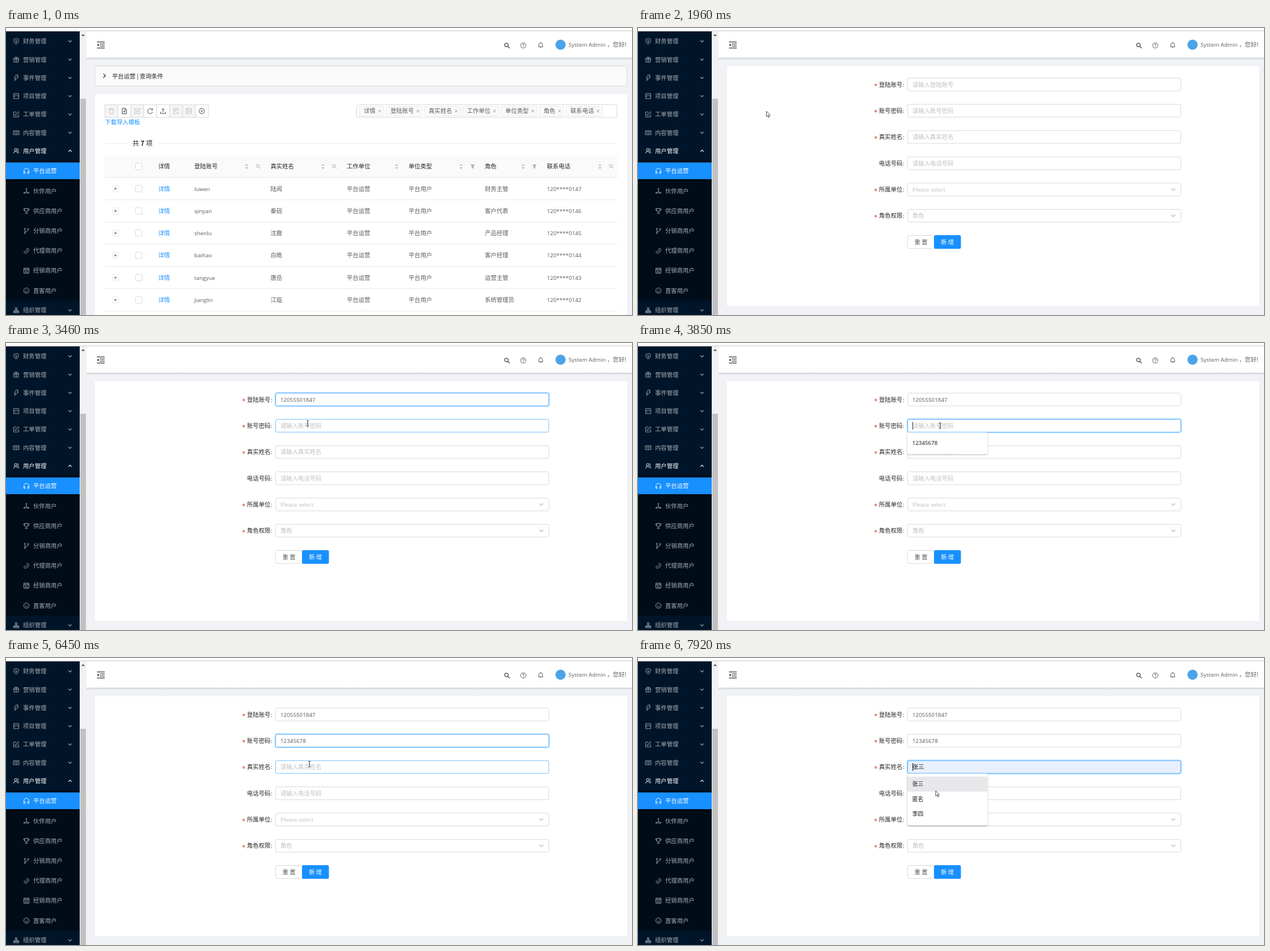
An HTML page that plays this animation: 1104x507 px, repeating every 7990 ms.

```html
<!DOCTYPE html>
<html lang="zh">
<head>
<meta charset="utf-8">
<title>User admin</title>
<style>
  html, body { margin: 0; width: 100%; height: 100%; overflow: hidden; background: #f0f2f5; }
  svg { display: block; width: 1104px; height: 507px; }
  text { white-space: pre; font-family: "Noto Sans CJK SC", "Noto Sans CJK", sans-serif; }
  text.latin { font-family: "Open Sans", "Noto Sans", sans-serif; }
</style>
</head>
<body>
<svg id="stage" viewBox="0 0 1104 507" xmlns="http://www.w3.org/2000/svg">
  <defs>
    <filter id="soft" x="-10%" y="-20%" width="120%" height="150%">
      <feDropShadow dx="0" dy="1" stdDeviation="1.3" flood-color="#000" flood-opacity=".4"/>
    </filter>
    <linearGradient id="fall" x2="0" y2="1">
      <stop offset="0" stop-color="#001529" stop-opacity=".16"/>
      <stop offset="1" stop-color="#001529" stop-opacity="0"/>
    </linearGradient>
  </defs>
  <g id="base"></g>
  <g id="view"></g>
  <g id="pointer"></g>
</svg>
<script>
const LOOP = 7990;
const BLUE = '#1890ff', SKY = '#40a9ff', DARK = '#262626', BODY = '#5c5c5c', PALE = '#bfbfbf', EDGE = '#d9d9d9';
const $ = id => document.getElementById(id);

// drawing helpers
const rect = (x, y, w, h, fill, stroke = 'none', r = 0, extra = '') =>
  `<rect x="${x}" y="${y}" width="${w}" height="${h}" rx="${r}" fill="${fill}" stroke="${stroke}" ${extra}/>`;
const path = (d, stroke, width = 1, fill = 'none') =>
  `<path d="${d}" fill="${fill}" stroke="${stroke}" stroke-width="${width}" stroke-linejoin="round"/>`;
const at = (x, y, inner, scale = 1) => `<g transform="translate(${x} ${y}) scale(${scale})">${inner}</g>`;
const hline = (x, y, w, color = '#e8e8e8') => rect(x, y, w, 1, color);

// y is the middle of the line of text
function text(x, y, s, fill = BODY, size = 10.35, extra = '') {
  const latin = /^[\x20-\x7e]+$/.test(s);
  const px = latin ? size * 0.947 : size;
  return `<text x="${x}" y="${y + size * 0.365}" font-size="${px}" fill="${fill}" ${latin ? 'class="latin"' : ''} ${extra}>${s}</text>`;
}

const ring = (x, y, r) => `M${x - r} ${y}a${r} ${r} 0 1 0 ${2 * r} 0a${r} ${r} 0 1 0 ${-2 * r} 0`;

const ICONS = {
  shield: 'M-4-3.6L0-5 4-3.6V1Q3 3.5 0 5Q-3 3.5-4 1ZM-1.8-2L0 0 1.8-2M0 0V2.6M-1.5 1H1.5',
  gift: 'M-4.5-2.5H4.5V0H-4.5ZM-4 0V4.5H4V0M0-2.5V4.5M0-2.5C-4-5-1-6 0-2.5C1-6 4-5 0-2.5',
  bolt: 'M-.5-5H3.5L1.5-1.5H4L-3 5L-1 .5H-3.5Z',
  board: 'M-4.5-4.5H4.5V4.5H-4.5ZM-2.4-2.5V2M0-2.5V0M2.4-2.5V1',
  edit: 'M4.3 0V4.5H-4.5V-4.3H0M-2 2L-1.6 0L3.5-5L5-3.5L0 1.5Z',
  book: 'M0-2.5V4M-5-3.5H-1Q0-3.5 0-2.5Q0-3.5 1-3.5H5V3.5H1Q0 3.5 0 4Q0 3.5-1 3.5H-5ZM-3.5-1.3H-1.6M-3.5.7H-1.6M1.6-1.3H3.5M1.6.7H3.5',
  users: ring(-1, -2, 2.2) + 'M-4.6 4.5Q-4 .6-1 .4Q1.6.6 3 4.5M1.6-4.4A2.3 2.3 0 0 1 2.6-.2Q4.4 1.2 4.8 3.6',
  headset: 'M-4.5 4.2V-.3A4.5 4.5 0 0 1 4.5-.3V4.2H2.3V1H4.5M-4.5 1H-2.3V4.2H-4.5',
  node: ring(0, -3.6, .9) + ring(-3.9, 3.3, .9) + ring(3.9, 3.3, .9) + 'M0-2.6V.6L-3.2 2.8M0 .6L3.2 2.8M-2.6 3.6H2.6',
  trophy: 'M-2.8-4.5H2.8V-1A2.8 2.8 0 0 1-2.8-1ZM-2.8-3.5H-4.8V-2Q-4.5-.5-2.6-.5M2.8-3.5H4.8V-2Q4.5-.5 2.6-.5M0 2V4.5M-2.5 4.5H2.5',
  branch: ring(-2.6, -3.6, 1.1) + ring(-2.6, 3.8, 1.1) + ring(3, -3, 1.1) + 'M-2.6-2.4V2.6M3-1.8Q3 .6-2.6 2',
  phone: 'M2-4.5L4.5-2.2Q4 4-2.5 4.5L-4.6 2.2L-2.2.2L-.6 1.5Q1.2.8 1.6-1L.2-2.4Z',
  shop: 'M-4.5-4.5H4.5V4.5H-4.5ZM-4.5-1.5H4.5M-2-4.5V-1.5M2-4.5V-1.5M-1.7 4.5V1.2H1.7V4.5',
  smile: ring(0, 0, 4.7) + 'M-2.3 1Q0 4 2.3 1M-1.8-1.8V-.8M1.8-1.8V-.8',
  org: 'M-1.5-4.5H1.5V-1.8H-1.5ZM0-1.8V1.8M-3.6 1.8V.2H3.6V1.8M-4.8 1.8H-2.4V4.4H-4.8ZM-1.2 1.8H1.2V4.4H-1.2ZM2.4 1.8H4.8V4.4H2.4Z',
  trash: 'M-4.5-3H4.5M-1.6-3V-4.6H1.6V-3M-3.5-3L-3 4.5H3L3.5-3',
  fileAdd: 'M-3.8-4.8H1L3.8-2V4.8H-3.8ZM1-4.8V-2H3.8M0-.9V3M-2 1H2',
  reload: 'M3.6-2.4A4.4 4.4 0 1 0 4.3 1.2M4.2-4.6V-2H1.6',
  upload: 'M-4.5 1.6V4.3H4.5V1.6M0 2V-4.2M-2-2.2L0-4.4 2-2.2',
  report: 'M4-.2V-4.5H-4V4.5H0M-2.2-2.3H2.2M-2.2-.2H.4M1.5 4.5Q3 .5 4.6 4.5ZM3 1.2V2',
  wallet: 'M-4.3-4.5H4.3V4.5H-4.3ZM4.3-1.3H.8V1.3H4.3M-2.3-4.5V4.5',
  cancel: ring(0, 0, 4.7) + 'M-1.8-1.8L1.8 1.8M1.8-1.8L-1.8 1.8',
  search: ring(-1, -1, 3.2) + 'M1.4 1.4L4.8 4.8',
  help: ring(0, 0, 4.7) + 'M-1.5-1Q-1.4-2.6 0-2.6Q1.6-2.5 1.5-1.1Q1.2 0 0 .4V1.2M0 2.2V3',
  bell: 'M-4.3 3H4.3M-3.2 3V-.5A3.2 3.2 0 0 1 3.2-.5V3M0-3.7V-4.9M-1.2 4.5H1.2',
  down: 'M-2.8-1.5L0 1.4 2.8-1.5',
  up: 'M-2.8 1.4L0-1.5 2.8 1.4',
  close: 'M-2.4-2.4L2.4 2.4M2.4-2.4L-2.4 2.4',
  plus: 'M-2.4 0H2.4M0-2.4V2.4'
};
const icon = (name, x, y, color, width = .9, scale = 1) => at(x, y, path(ICONS[name], color, width), scale);

function sidebar() {
  const grey = '#a6adb4';
  const main = [['shield', '财务管理'], ['gift', '营销管理'], ['bolt', '事件管理'], ['board', '项目管理'],
    ['edit', '工单管理'], ['book', '内容管理'], ['users', '用户管理']];
  const sub = [['headset', '平台运营'], ['node', '伙伴用户'], ['trophy', '供应商用户'], ['branch', '分销商用户'],
    ['phone', '代理商用户'], ['shop', '经销商用户'], ['smile', '直客用户']];
  const row = (ic, s, y, color, arrow) =>
    icon(ic, 18, y, color) + text(30, y, s, color) + icon(arrow, 113, y, color, 1.1);
  let out = rect(0, 6, 130, 501, '#001529') + rect(0, 234.5, 130, 247, '#000c17') + rect(0, 237.5, 130, 29.5, BLUE);
  main.forEach(([ic, s], i) => {
    const open = i === 6;
    out += row(ic, s, 23.5 + i * 32.28, open ? '#fff' : grey, open ? 'up' : 'down');
  });
  sub.forEach(([ic, s], i) => {
    const y = 252.7 + i * 35.2, color = i ? grey : '#fff';
    out += icon(ic, 36, y, color) + text(48, y, s, color);
  });
  out += row('org', '组织管理', 498.7, grey, 'down');
  return out + rect(130, 6, 12, 501, '#f1f1f1') + rect(131, 125, 10, 382, '#c1c1c1') +
    path('M133 14L136 10.8L139 14Z', 'none', 0, '#505050');
}

function header() {
  const ink = '#4a4a4a';
  return rect(142, 6, 962, 46.5, '#fff') + rect(142, 52.5, 962, 4, 'url(#fall)') +
    path('M160.5 24.6H174M165.5 28.3H174M165.5 31.8H174M160.5 35.4H174', '#333', 1.2) +
    path('M163.6 27.6V32.4L160.4 30Z', 'none', 0, '#333') +
    icon('search', 883.5, 31, ink, 1.3) + icon('help', 912.3, 30.7, ink) + icon('bell', 943, 30, ink) +
    `<circle cx="978" cy="29.5" r="9" fill="#4ba3e8"/>` +
    text(992, 29.7, 'System Admin') + text(1060, 29.7, '，您好!');
}

const COLS = [['详情', 268.5], ['登陆账号', 332, 424.5, 'search', 445], ['真实姓名', 466.5, 559, 'search', 579],
  ['工作单位', 601, 689], ['单位类型', 710, 802.5, 'filter', 823], ['角色', 844.5, 912, 'filter', 932],
  ['联系电话', 954, 1047.5, 'search', 1067.5]];
const PEOPLE = [['luwen', '陆闻', '财务主管'], ['qinyan', '秦砚', '客户代表'], ['shenlu', '沈鹿', '产品经理'],
  ['baihao', '白皓', '客户经理'], ['tangyue', '唐岳', '运营主管'], ['jianglin', '江临', '系统管理员']];
const TAGS = [[623.5, 43], [670.5, 63.5], [738, 63.5], [805.5, 63.5], [873, 63.5], [940.5, 43], [988, 63.5]];
const TOOLS = ['trash', 'fileAdd', 'edit', 'reload', 'upload', 'report', 'wallet', 'cancel'];

function tableView() {
  const checkbox = y => rect(228.5, y - 5.7, 11.4, 11.4, '#fff', EDGE, 1.5);
  let out = rect(157, 67.5, 938, 35, '#fafafa', EDGE, 3) + path('M171.5 80.6L175.5 84.3L171.5 88', DARK, 1.2) +
    text(187, 85, '平台运营 | 查询条件', DARK) + rect(157, 117, 938.5, 390, '#fff');

  TOOLS.forEach((ic, i) => {
    const off = [0, 2, 5, 6].includes(i);
    out += rect(174.5 + i * 22.8, 135.5, 22.8, 22.5, off ? '#f5f5f5' : '#fff', EDGE) +
      icon(ic, 186 + i * 22.75, 146.7, off ? PALE : '#444', 1);
  });

  out += rect(618.5, 135.5, 459, 22.5, '#fff', EDGE, 3);
  TAGS.forEach(([x, w], i) => {
    out += rect(x, 138.5, w, 17, '#fafafa', '#e8e8e8', 1.5) + text(x + 7.5, 146.7, COLS[i][0]) +
      icon('close', x + w - 7.5, 146.7, '#8c8c8c', .9);
  });

  out += hline(174, 203.7, 42) + hline(268, 203.7, 810) +
    text(223, 204, '共 <tspan font-weight="700">7</tspan> 项', DARK, 11.7);

  out += rect(174, 225, 904, 39, '#fafafa') + hline(174, 263.5, 904) + checkbox(244.5);
  COLS.forEach(([name, x, sort, kind, kx]) => {
    out += text(x, 244.5, name, DARK);
    if (sort) out += at(sort, 244.5, path('M-3-1.2L0-4.6L3-1.2ZM-3 1.4L0 4.8L3 1.4Z', 'none', 0, PALE));
    if (kind === 'search') out += icon('search', kx, 244.5, '#a6a6a6', 1.1, .85);
    if (kind === 'filter') out += at(kx, 244.5, path('M-4-3.6H4L1.6 0V3.6H-1.6V0Z', 'none', 0, '#b5b5b5'));
  });

  PEOPLE.forEach(([user, name, role], i) => {
    const y = 283.8 + i * 39.3;
    const cells = ['详情', user, name, '平台运营', '平台用户', role, '120****01' + (47 - i)];
    out += rect(187.5, y - 5.5, 11, 11, '#fff', '#e8e8e8', 1) + icon('plus', 193, y, '#555') + checkbox(y);
    cells.forEach((s, c) => out += text(COLS[c][1], y, s, c ? BODY : BLUE));
    out += hline(174, Math.round((y + 19.2) * 2) / 2, 904);
  });
  return out;
}

// pointer path: time, x, y
const TRACK = [[310, 996, 466], [1030, 222, 163], [1110, 219, 156], [1350, 218.5, 149], [1810, 218.5, 149],
  [1960, 226.5, 147], [2290, 531, 101], [2450, 531, 101], [2610, 531, 131], [3140, 531, 132], [3456, 532, 142],
  [3614, 533, 146], [6050, 533, 146], [6442, 535, 187.5], [6520, 535, 191], [7600, 535, 191], [7920, 525, 234.5]];
// spans in which the screen refreshes: start, end, steps
const SPANS = [[310, 1030, 10], [1110, 1810, 10], [1960, 2690, 10], [3140, 3850, 10], [5820, 6520, 10],
  [6620, 6840, 4], [7680, 7920, 4]];

function refreshTime(t) {
  const [a, b, n] = SPANS.filter(s => s[0] <= t).pop() || SPANS[0];
  const step = (b - a) / (n - 1);
  return a + Math.floor((Math.min(t, b) - a) / step + 1e-6) * step;
}

function pointerAt(t) {
  const i = TRACK.findIndex(p => p[0] > t);
  if (i < 0) return TRACK[TRACK.length - 1].slice(1);
  if (i === 0) return TRACK[0].slice(1);
  const [t0, x0, y0] = TRACK[i - 1], [t1, x1, y1] = TRACK[i];
  const k = (t - t0) / (t1 - t0), e = k * k * (3 - 2 * k);
  return [x0 + (x1 - x0) * e, y0 + (y1 - y0) * e];
}

const OPEN = 1580, PHONE = '12055501847', PASS = '12345678';
const KEYS = [4340, 4410, 4670, 4890, 5110, 5360, 5620, 5820];
const FIELDS = ['登陆账号', '账号密码', '真实姓名', '电话号码', '所属单位', '角色权限'];
const rowY = i => 99.8 + i * 46.38;
const blink = (t, since) => (t - since) % 1060 < 530;

function popup(top, items, hot) {
  let out = rect(475, top, 141.5, 12 + items.length * 26.5, '#fff', 'none', 2, 'filter="url(#soft)"');
  items.forEach((s, i) => {
    const y = top + 5.3 + i * 26.5;
    if (i === hot) out += rect(475, y, 141.5, 26.5, '#e8e8eb');
    out += text(483.7, y + 13.2, s, '#111', /\d/.test(s) ? 10.3 : 9.75);
  });
  return out;
}

function formView(t, [px, py]) {
  const typed = KEYS.filter(k => k <= t).length;
  const focus = t < 2290 ? -1 : t < 3610 ? 0 : t < 6620 ? 1 : 2;
  const picking = t >= 2290 && t < 2900 && py > 118;
  const naming = t >= 7680 && py > 209.5;
  const values = [picking || t >= 2900 ? PHONE : '', PASS.slice(0, typed), naming ? '张三' : ''];
  const preview = [picking, false, naming];
  const since = [t < 2900 ? 2290 : 2900, typed ? KEYS[typed - 1] : 3640, 6610][focus];
  const menu = t >= 2290 && t < 2900 || t >= 6690;

  let out = rect(157, 67.5, 938.5, 423.5, '#fff');
  FIELDS.forEach((name, i) => {
    const y = rowY(i), v = values[i], on = i === focus;
    const hover = !menu && px > 475 && px < 957 && Math.abs(py - y) < 11.8;
    if (i !== 3) out += at(419.3, y + .8, path('M0-2.6V2.6M-2.3-1.3L2.3 1.3M2.3-1.3L-2.3 1.3', '#e0523f', .9));
    out += text(425, y, name, DARK) + text(467, y, ':', DARK);
    if (on) out += rect(475, y - 11.8, 483, 23.6, 'none', BLUE, 3.4, 'stroke-width="3.2" stroke-opacity=".22"');
    out += rect(475.5, y - 11.3, 481.7, 22.6, preview[i] ? '#e8f0fe' : '#fff', on ? SKY : hover ? '#74bdfa' : EDGE, 2.8);
    const hint = i === 4 ? 'Please select' : i === 5 ? '角色' : '请输入' + name;
    out += text(484, y, v || hint, v ? (preview[i] ? '#111' : BODY) : PALE);
    if (i > 3) out += icon('down', 944, y, PALE, 1.1, 1.25);
    if (on && blink(t, since)) out += rect(484 + (preview[i] ? 0 : v.length * 5.6) - .1, y - 6.6, 1, 13.5, '#222');
  });

  out += rect(475.5, 366.5, 47, 23, '#fff', EDGE, 2.8) + rect(522, 366, 47.5, 24, BLUE, 'none', 2.8) +
    text(499, 378, '重 置', BODY, 10.35, 'text-anchor="middle"') +
    text(545.7, 378, '新 增', '#fff', 10.35, 'text-anchor="middle"');

  if (t >= 2290 && t < 2900) out += popup(112, [PHONE, '12055501846', 'admin', 'test', 'demo01'], picking ? 0 : -1);
  if (t >= 3690 && t < 5970) out += popup(157.8, [PASS], -1);
  if (t >= 6690) out += popup(204.2, ['张三', '匿名', '李四'], naming ? 0 : -1);
  return out;
}

const SHAPES = {
  arrow: path('M0 0V9.6L2.2 7.6L3.8 11L5.2 10.4L3.7 7H6.6Z', '#222', .8, '#fff'),
  beam: path('M-1.8-4.8H-.5L0-4.3L.5-4.8H1.8M0-4.3V4.3M-1.8 4.8H-.5L0 4.3L.5 4.8H1.8', '#222', 1),
  hand: path('M-1 1Q0-.6 1 1V5L4.6 5.8Q6 6.2 5.8 8L5 11V13H-.6V11.4L-3.4 8Q-3.6 6.4-2.2 6.8L-1 8ZM2.6 5.4V7.2M4.2 5.8V7.4', '#222', .9, '#fff')
};

function pointerKind(t, [x, y]) {
  if (t < OPEN) return x < 237 && y < 173 ? 'hand' : 'arrow';
  const menu = t >= 2290 && t < 2900 || t >= 6690;
  const inField = x > 475 && FIELDS.some((_, i) => Math.abs(y - rowY(i)) < 11.8);
  return inField && !(menu && y > (t < 2900 ? 112 : 204)) ? 'beam' : 'arrow';
}

const table = tableView();
function listView(t, [x, y]) {
  const seen = t >= 310;
  const onLink = seen && x < 237 && y > 159 && y < 173;
  const onAdd = t >= 1180 && y < 158;
  return table + text(174.5, 166.5, '下载导入模板', onLink ? SKY : BLUE) +
    (onAdd ? rect(197.3, 135.5, 22.8, 22.5, '#fff', SKY) + icon('fileAdd', 208.75, 146.7, SKY, 1) : '');
}

const drawn = {};
function put(id, markup) {
  if (drawn[id] === markup) return;
  drawn[id] = markup;
  $(id).innerHTML = markup;
}

function draw(t) {
  const p = pointerAt(refreshTime(t));
  put('view', t < OPEN ? listView(t, p) : formView(t, p));
  put('pointer', t < 310 ? '' : at(p[0], p[1], SHAPES[pointerKind(t, p)]));
}

put('base', rect(0, 0, 1104, 507, '#f0f2f5') + rect(0, 0, 1104, 6, '#fff') + rect(0, 4.5, 1104, 1, '#c6c6c6') +
  sidebar() + header());

const start = performance.now();
function tick() {
  draw((performance.now() - start) % LOOP);
  requestAnimationFrame(tick);
}
tick();
</script>
</body>
</html>
```
